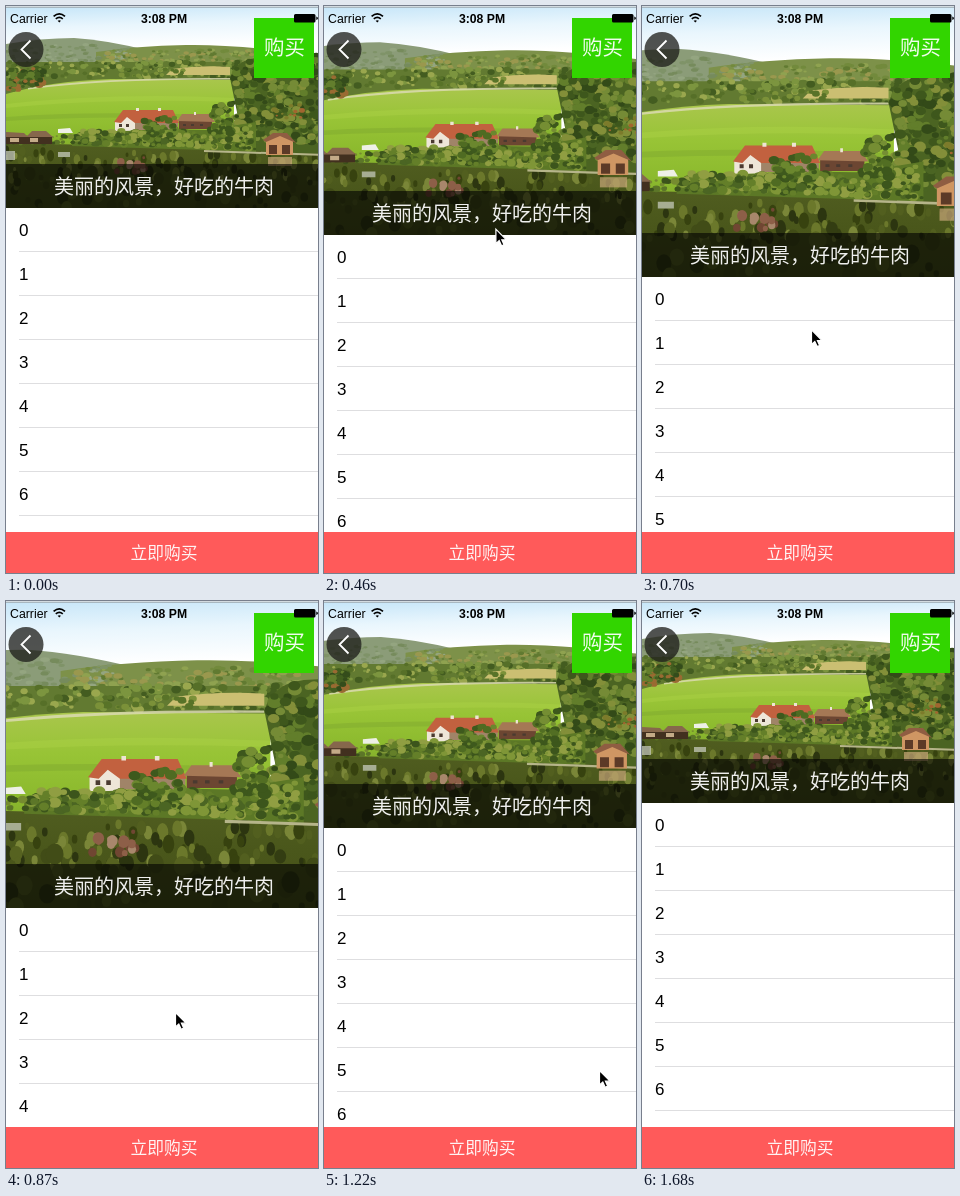
Animation, 312 px wide and 567 px high, one loop 1.71 s. Source, as an HTML page:

```html
<!DOCTYPE html>
<html lang="zh-CN">
<head>
<meta charset="utf-8">
<style>
html, body { margin: 0; width: 100%; height: 100%; overflow: hidden; background: #fff; }
svg { display: block; }
text { font-family: "Liberation Sans", Arial, sans-serif; }
.zh { font-family: "Noto Sans CJK SC Light", "Noto Sans CJK SC", "Noto Sans CJK", sans-serif; font-weight: 300; fill: #fff; fill-opacity: .93; text-anchor: middle; }
</style>
</head>
<body>
<svg width="312" height="567" viewBox="0 0 312 567">
  <defs>
    <linearGradient id="sky" x2="0.12" y2="1">
      <stop offset="0" stop-color="#c3e4f8"/><stop offset=".25" stop-color="#e9f6fd"/><stop offset=".5" stop-color="#fff"/>
    </linearGradient>
    <linearGradient id="meadow" x2="0" y2="1">
      <stop offset="0" stop-color="#a9c64c"/><stop offset=".35" stop-color="#98c436"/><stop offset=".75" stop-color="#8bb92d"/><stop offset="1" stop-color="#7fa62e"/>
    </linearGradient>
    <linearGradient id="water" x2="0" y2="1">
      <stop offset="0" stop-color="#505d20"/><stop offset=".4" stop-color="#4a571b"/><stop offset="1" stop-color="#465017"/>
    </linearGradient>
  </defs>
  <g id="photo"></g>
  <g id="sheet">
    <rect y="-44" width="312" height="44" opacity=".6"/>
    <text class="zh" x="158" y="-14.5" font-size="20">美丽的风景，好吃的牛肉</text>
    <rect width="312" height="400" fill="#fff"/>
    <g id="rows"></g>
  </g>
  <rect y="526" width="312" height="41" fill="#ff5a5a"/>
  <text class="zh" x="158" y="553" font-size="16.8">立即购买</text>
  <rect x="248" y="12" width="60" height="60" fill="#32d500"/>
  <text class="zh" x="278.5" y="49" font-size="20.5">购买</text>
  <circle cx="20" cy="43.5" r="17.5" fill="#1e1e1a" opacity=".76"/>
  <path d="M24.5 34.5L15.5 43.5L24.5 52.5" fill="none" stroke="#fff" stroke-width="1.8"/>
  <rect width="312" height="1" fill="#d3dbe0"/>
  <rect y="1" width="312" height="1" fill="#a8b7c0"/>
  <text x="4" y="16.5" font-size="12.3">Carrier</text>
  <text x="158" y="16.5" font-size="12.2" font-weight="700" text-anchor="middle">3:08 PM</text>
  <g fill="none" stroke="#000" stroke-width="1.7">
    <path d="M47.6 10.4Q53.3 5.4 59 10.4M49.8 12.8Q53.3 9.8 56.8 12.8"/>
    <path d="M53.3 16.6L51.6 14.8Q53.3 13.6 55 14.8Z" fill="#000" stroke="none"/>
  </g>
  <path d="M289.5 8H308Q309.5 8 309.5 9.5V15Q309.5 16.5 308 16.5H289.5Q288 16.5 288 15V9.5Q288 8 289.5 8ZM310.3 10.5Q312 11 312 12.2T310.3 14Z"/>
  <path id="cursor" d="M.5 .5V15L3.8 12L6.2 17.2L8.6 16.1L6.4 11.2H11Z" stroke="#fff" stroke-width="1.2"/>
</svg>
<script>
const $ = id => document.getElementById(id);
const photo = $('photo');
const REST = 202, MID = 158, STEP = 57.9, LOOP = 1710;

function add(parent, tag, attrs) {
  const el = document.createElementNS('http://www.w3.org/2000/svg', tag);
  for (const k in attrs) el.setAttribute(k, attrs[k]);
  parent.append(el);
  return el;
}
const shape = (d, fill, opacity = 1) => add(photo, 'path', { d, fill, opacity });

let seed = 7;
const rnd = () => (seed = (seed * 16807) % 2147483647) / 2147483647;

// Scatters n blobs between the heights top(x) and bottom(x).
function foliage(n, x0, x1, top, bottom, size, colors, flat = 0.8) {
  for (let i = 0; i < n; i++) {
    const x = x0 + rnd() * (x1 - x0), r = size * (0.5 + rnd());
    const y = top(x) + rnd() * (bottom(x) - top(x));
    add(photo, 'ellipse', { cx: x, cy: y, rx: r, ry: r * flat, fill: colors[i % colors.length] });
  }
}
const at = y => () => y;

function paintPhoto() {
  shape('M0 0H320V90H0Z', 'url(#sky)');

  // hills
  shape('M0 38Q35 32 68 32Q100 34 140 44V80H0Z', '#8b9c78');
  shape('M90 46Q130 40 180 39T320 50V80H90Z', '#7d9149');
  foliage(110, 0, 125, x => 37 + Math.abs(x - 65) / 13, at(56), 2.2, ['#7f9368', '#94a580', '#768b5c'], 0.5);
  foliage(150, 100, 250, at(44), at(60), 2.2, ['#728a3c', '#8fa250', '#617a31', '#9a984e'], 0.6);
  shape('M0 56H320V90H0Z', '#627a31');
  foliage(190, 0, 260, at(56), at(72), 2.4, ['#566f28', '#7c953f', '#435c20', '#9aa74e']);
  shape('M166 63Q195 59 224 61V69H160Z', '#cbbf72');
  foliage(26, 115, 178, at(63), at(70), 2, ['#587328', '#7b9139']);

  // meadow
  shape('M0 88Q45 75 105 73L228 74V150H0Z', 'url(#meadow)');
  shape('M22 82Q90 71 224 72V73.5Q95 73 22 83.5Z', '#dfdcb8', 0.8);
  shape('M0 98Q110 86 228 92V96Q100 92 0 102Z', '#abd046', 0.45);
  shape('M0 111Q90 104 228 110V113Q90 109 0 115Z', '#7ba42f', 0.4);
  foliage(90, 0, 38, at(62), x => 86 - x * 0.2, 2.8, ['#435e20', '#637e2d', '#344c1b', '#9a6a32']);

  // right wood
  shape('M224 72Q230 54 250 52L320 48V150H240Z', '#4b6422');
  foliage(330, 227, 320, x => 57 - (x - 227) / 12, at(136), 3.4, ['#3e571c', '#627e2b', '#334a18', '#758b36', '#838f39']);
  foliage(12, 268, 298, at(98), at(112), 2, ['#a1652f', '#7c7b2b']);

  // houses
  shape('M109 116L116 107L130 116V125H109Z', '#eee6d8');
  shape('M129 116H172V124H129Z', '#a08468');
  shape('M108 116L117 104H167L173 117H129L121 111L115 117Z', '#c2613f');
  shape('M173 114H206V123H173Z', '#6c4632');
  shape('M171 115L176 108H203L209 116Z', '#a57855');
  shape('M130 102h3v3h-3ZM152 102h3v3h-3ZM188 106h2v3h-2Z', '#eee4d4');
  shape('M113 118h3v3h-3ZM120 118h3v3h-3ZM177 118h3v2h-3ZM185 118h3v2h-3ZM194 118h3v2h-3Z', '#4a3a30');

  // water and shore
  shape('M0 137L90 139L200 143L320 148V204H0Z', 'url(#water)');
  foliage(130, 0, 320, x => 143 + x / 45, at(174), 2.6, ['#6b782b', '#37420f', '#7a8638', '#2c3510', '#525f1f'], 1.6);
  foliage(70, 0, 320, at(166), at(202), 4, ['#333d12', '#566220', '#414c17'], 1.2);
  foliage(16, 108, 142, at(151), at(167), 2.6, ['#8d5f48', '#a8876c', '#704632'], 1.1);
  shape('M0 145H9V154H0ZM52 146h12v5h-12Z', '#c4c9ba', 0.75);
  shape('M66 130Q130 122 200 124L250 116V146L200 144L66 140Z', '#5c7826');
  foliage(290, 70, 256, x => 125 - Math.max(0, x - 190) / 8, x => 137 + (x - 70) / 30, 2.9,
    ['#647f29', '#7f9637', '#4b6523', '#909e42', '#3c551c']);
  foliage(50, 137, 169, at(111), at(132), 2.8, ['#4f6b22', '#6b872e', '#3e591d']);
  foliage(55, 207, 225, at(98), at(128), 3.2, ['#526e23', '#758e33', '#3d571c']);
  foliage(40, 0, 75, at(130), at(138), 2.2, ['#5c7628', '#3c531b', '#758b30']);
  shape('M198 144L320 148V150L198 146Z', '#b6b58a');

  // boathouses
  shape('M0 130H46V138H0Z', '#42301f');
  shape('M0 126L18 127L22 131H0ZM20 131L26 125H40L47 131Z', '#86674c');
  shape('M24 132h8v4h-8ZM4 132h9v4h-9Z', '#c4ab88');
  shape('M52 123L64 122L67 127H52Z', '#eef0e6');
  shape('M260 134L272 128L287 135V149H260Z', '#cf9663');
  shape('M257 134L267 127H281L290 137L274 130L260 136Z', '#8f5d42');
  shape('M263 139h8v9h-8ZM276 139h8v9h-8Z', '#5c3a27');
  shape('M262 151H286V160H262Z', '#c9a87a', 0.7);
}

function paintRows() {
  for (let i = 0; i < 9; i++) {
    add($('rows'), 'text', { x: 13, y: 44 * i + 27.5, 'font-size': 17 }).textContent = i;
    add($('rows'), 'rect', { x: 13, y: 44 * i + 43, width: 312, height: 1, fill: '#dedee0' });
  }
}

// Pointer path: [step, x, y]
const path = [
  [2, 214, 12], [4, 184, 125], [5, 175, 159], [10, 169, 265], [15, 169, 411], [16, 169, 425],
  [18, 169, 425], [19, 196, 432], [21, 275, 469], [25, 294, 560], [26, 298, 580]
];

function pointer(n) {
  const i = path.findIndex(p => p[0] >= n);
  if (i < 0 || n < path[0][0]) return null;
  if (!i) return path[0].slice(1);
  const [a, b] = [path[i - 1], path[i]], k = (n - a[0]) / (b[0] - a[0]);
  return [1, 2].map(j => a[j] + (b[j] - a[j]) * k);
}

// The list follows the drag with resistance, then springs back.
function pull(n, pos) {
  if (n <= 5) return 0;
  return n <= 18 ? 0.417 * (pos[1] - 159) : 111 * 0.608 ** (n - 18);
}

function draw(now) {
  const n = Math.floor((now % LOOP) / STEP + 0.1);
  const pos = pointer(n);
  const h = REST + Math.round(pull(n, pos));
  const s = h / REST;
  photo.setAttribute('transform', `translate(${MID * (1 - s)} 0) scale(${s})`);
  $('sheet').setAttribute('transform', `translate(0 ${h})`);
  $('cursor').setAttribute('transform', `translate(${pos || [-50, -50]})`);
  requestAnimationFrame(() => draw(performance.now() - start));
}

paintPhoto();
paintRows();
const start = performance.now();
draw(0);
</script>
</body>
</html>
```
